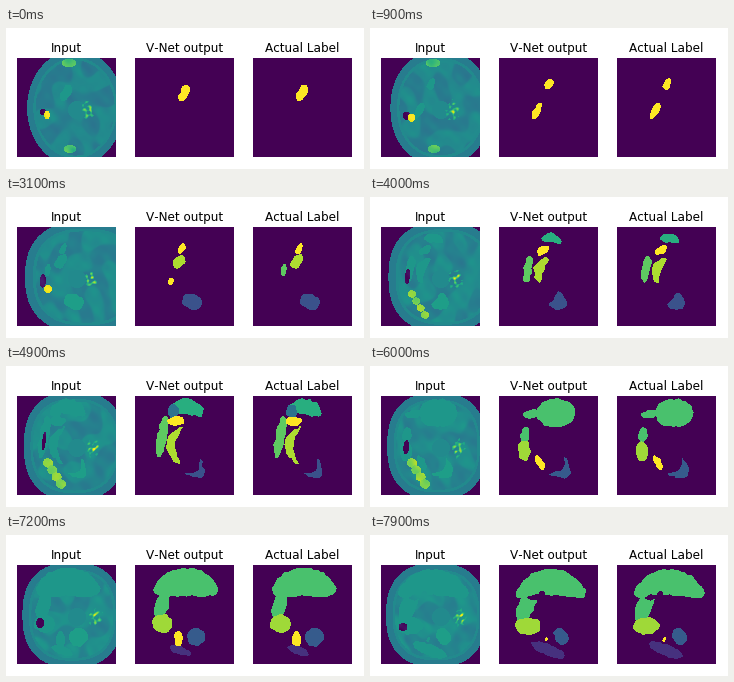
Recreate the animation shown at these times as a matplotlib script. Size 358x141 px, loop 8000 ms.

```python
import numpy as np
import matplotlib.pyplot as plt
from matplotlib.animation import FuncAnimation

W, H, SIDE, FRAMES = 358, 141, 99, 80
PRED, TRUTH = 0, 1
SPLEEN, KIDNEY, GALL, LIVER, STOMACH, PANCREAS, DUODENUM = 1, 2, 3, 5, 6, 7, 8

plt.rcParams.update({"font.family": "DejaVu Sans", "text.kerning_factor": 6})
Y, X = np.mgrid[0:SIDE, 0:SIDE] + 0.5


class Bean:
    """Bent oval whose parameters ease linearly between a few keys.

    A key is (slice, x, y, half length, half width, degrees, bend).
    """

    def __init__(self, value, *keys, start=-9, end=90, panels=(PRED, TRUTH)):
        self.value, self.start, self.end, self.panels = value, start, end, panels
        self.times, *self.params = np.array(keys, float).T

    def mask(self, t, x, y):
        size = np.clip(min(t - self.start, self.end - t) / 5, 0, 1)
        if size == 0:
            return np.zeros(x.shape, bool)
        cx, cy, a, b, deg, bend = (np.interp(t, self.times, p) for p in self.params)
        c, s = np.cos(np.radians(deg)), np.sin(np.radians(deg))
        u = ((x - cx) * c + (y - cy) * s) / (a * size)
        v = ((y - cy) * c - (x - cx) * s - bend * size * u ** 2) / (b * size)
        return np.abs(u) ** 2.4 + v ** 2 < 1


def waves(seed, scale, count=9):
    """Smooth random field that drifts with time."""
    r = np.random.default_rng(seed)
    ang, freq = r.uniform(0, 6.28, count), r.uniform(0.6, 1.5, count) / scale
    ph, sp = r.uniform(0, 6.28, count), r.uniform(-0.35, 0.35, count)

    def field(t):
        total = sum(np.sin(f * (X * np.cos(a) + Y * np.sin(a)) + p + s * t)
                    for a, f, p, s in zip(ang, freq, ph, sp))
        return total / np.sqrt(count / 2)
    return field


def stomach(start, panel):
    return Bean(STOMACH, (31, 31, 43, 6, 3, 100, 0), (49, 27, 41, 21, 5, 100, 0),
                (60, 25, 55, 10, 6, 90, 0), (79, 29, 61, 8.5, 12.5, 90, 0),
                start=start, panels=(panel,))


def low_duodenum(end, panel):
    return Bean(DUODENUM, (17, 38, 53, 11, 4.5, 120, 0), (31, 36, 55, 4, 2.5, 110, 0),
                start=5, end=end, panels=(panel,))


# Later organs paint over earlier ones
organs = [
    Bean(LIVER, (49, 53, 11, 16, 8, 10, 3), (60, 57, 17, 19, 14, 0, 0),
         (72, 51, 17, 32, 14, 0, 8), (79, 52, 17, 35, 13, 0, 12), start=37),
    Bean(LIVER, (60, 33, 18, 9, 4, -10, 0), start=50),
    Bean(LIVER, (60, 26, 39, 8, 4.5, 100, 0), (79, 27, 42, 16, 8, 115, 0), start=53),
    Bean(0, (79, 36, 32, 8, 2.5, -10, 0), start=73),
    Bean(0, (79, 43, 30, 3, 4, 0, 0), start=73),
    Bean(GALL, (49, 38.5, 15.5, 5.5, 6.5, 0, 0), start=41, end=56),
    stomach(33, PRED),
    stomach(26, TRUTH),
    Bean(PANCREAS, (17, 47, 29, 8, 6, 90, 0), (31, 44, 34.5, 8, 5, 128, 0),
         (49, 36, 49, 19, 4.5, 93, -10), (60, 41, 67, 8, 3.5, 62, 0),
         (72, 43.5, 74, 8, 4, 90, 0), (79, 47.5, 74.5, 2, 2, 90, 0), start=9),
    Bean(DUODENUM, (0, 49, 35, 9, 4.5, 115, 0), (17, 51, 18, 3, 3, 115, 0),
         (31, 46.5, 21.5, 5.5, 3, 115, 0), (49, 41, 25, 8.5, 4.5, 180, 0), end=56),
    low_duodenum(38, PRED),
    low_duodenum(30, TRUTH),
    Bean(KIDNEY, (17, 56, 75, 4, 4, 135, 0), (31, 57, 74.5, 7.5, 10, 115, 0),
         (49, 65, 77.5, 10, 4, 135, 10), (60, 66, 77, 11, 5, 135, 10),
         (72, 61.5, 72, 9, 9, 135, 0), (79, 62.5, 71.5, 6.5, 9, 150, 0), start=12),
    Bean(SPLEEN, (72, 45, 85.5, 11, 4, 20, 0), (79, 49, 85, 18, 5.5, 22, 0), start=65),
]

# Bowel gas and contrast, rib ends, then a chain of bright loops
details = [
    Bean(0.02, (0, 26, 54, 3, 3, 90, 0), (17, 25, 61, 5, 4, 90, 0),
         (49, 27, 45, 9, 1.8, 97, 0), (79, 22, 62, 4, 4.5, 90, 0)),
    Bean(0.95, (0, 30, 57, 4, 3, 90, 0), (17, 31, 62, 4, 4, 90, 0), end=38),
    Bean(0.72, (0, 52, 5, 7, 4, 0, 0), end=26),
    Bean(0.72, (0, 53, 91, 6, 4, 0, 0), end=30),
] + [Bean(0.84 - 0.04 * (k % 2), (55, 31 + 4.3 * k, 67 + 7 * k, 5, 4.5, 20, 0),
          start=36, end=69) for k in range(4)]

soft, fine, grain = waves(3, 5), waves(8, 2.2), waves(21, 0.9, 14)
warps = [(waves(30 + k, 1.6), waves(40 + k, 1.6)) for k in range(2)]


def labels(t, panel):
    wx, wy = (w(t) * 0.4 for w in warps[panel])
    img = np.zeros((SIDE, SIDE))
    for o in organs:
        if panel in o.panels:
            img[o.mask(t, X + wx, Y + wy)] = o.value
    return img


def scan(t, label):
    p = t / (FRAMES - 1)
    cx = 58 + 12 * np.exp(-((t - 28) / 14) ** 2) - 3 * p
    left, ry, n = 10 - 5 * p, 58 - 6 * p, 2 + 0.45 * min(1, t / 25)
    r = (np.abs((X - cx) / (cx - left)) ** n + np.abs((Y - 50) / ry) ** n) ** (1 / n)

    img = 0.445 + 0.03 * p + 0.035 * np.tanh(3 * soft(t)) + 0.01 * fine(t)
    img[(r > 0.82) & (r < 0.87)] = 0.48
    img[r >= 0.87] = 0.42
    img[label > 0] = 0.53
    img[label == KIDNEY] = 0.56

    # Vertebra and the bone speckle behind it
    img[np.hypot(X - 60, Y - 52) < 9] = 0.48
    near = np.exp(-((X - 71 - 8 * p) / 6) ** 2 - ((Y - 52) / 8) ** 2)
    bone = near * (0.35 + 0.4 * grain(t * 3))
    img = np.where(bone > 0.2, 0.45 + 0.5 * bone, img)

    for d in details:
        m = d.mask(t, X, Y)
        img[m] = d.value + 0.03 * fine(t)[m]
    img[r > 1] = 0
    return np.clip(img, 0, 1)


def slices(t):
    pred, truth = labels(t, PRED), labels(t, TRUTH)
    return scan(t, truth), pred / max(pred.max(), 1), truth / max(truth.max(), 1)


stack = [slices(t) for t in range(FRAMES)]

fig = plt.figure(figsize=(W / 72, H / 72), dpi=72, facecolor="white")
images = []
for x, title in zip((11, 129, 247), ("Input", "V-Net output", "Actual Label")):
    ax = fig.add_axes([x / W, 12 / H, SIDE / W, SIDE / H])
    ax.set_title(title, fontsize=12)
    ax.axis("off")
    images.append(ax.imshow(stack[0][len(images)], cmap="viridis", vmin=0, vmax=1,
                            interpolation="nearest", aspect="auto"))


def update(i):
    for im, data in zip(images, stack[i]):
        im.set_data(data)
    return images


anim = FuncAnimation(fig, update, frames=FRAMES, interval=100, repeat=True,
                     repeat_delay=0, blit=False)
plt.show()
```
